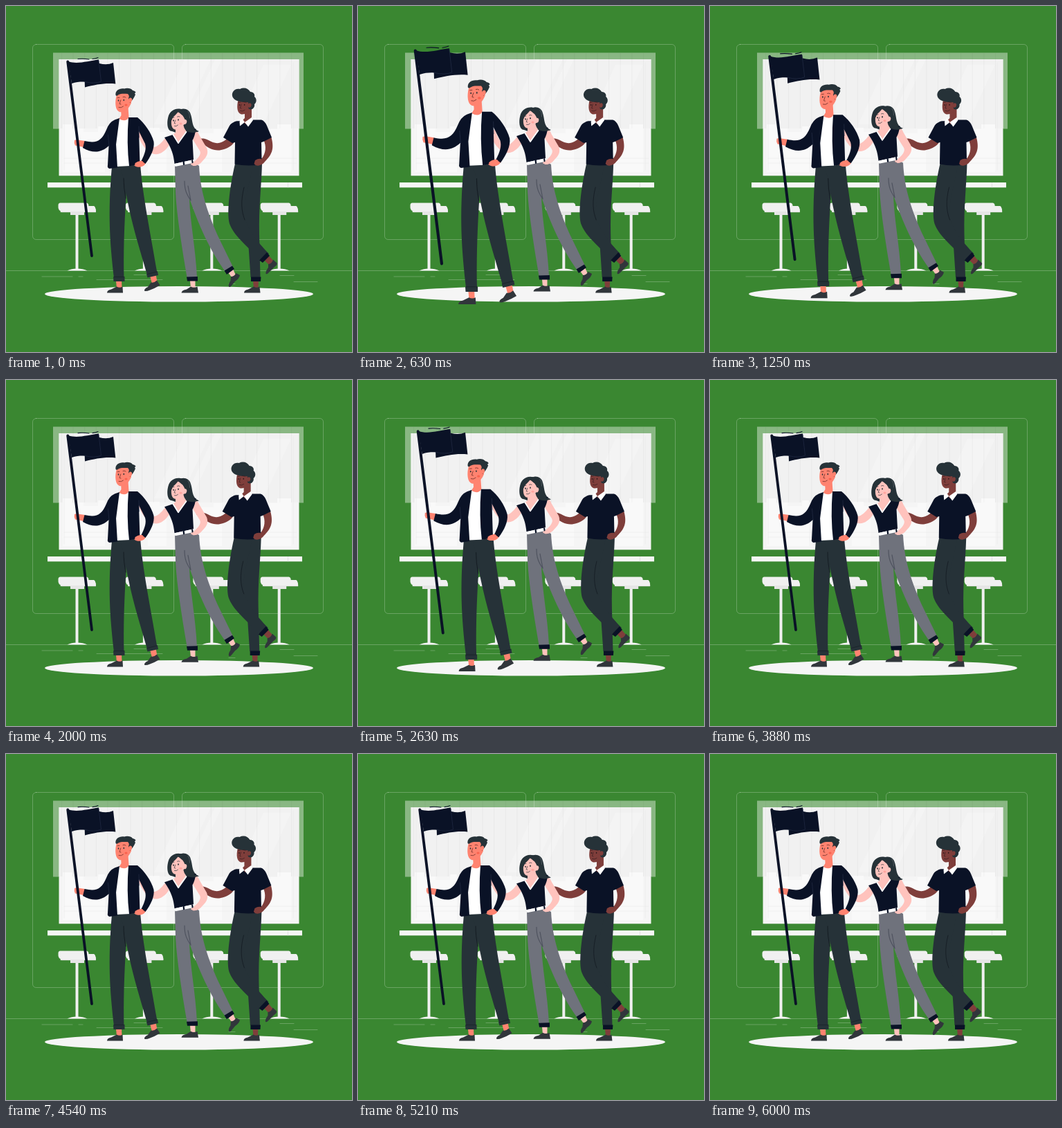
Recreate the animation shown at these times as an HTML page with a canvas. Size 500x500 px, loop 6.04 s.

```html
<!DOCTYPE html>
<html lang="en">
<head>
<meta charset="utf-8">
<title>Team with flag</title>
<style>
html, body { margin: 0; width: 100%; height: 100%; overflow: hidden; background: #3a8731; }
canvas { display: block; width: 500px; height: 500px; }
</style>
</head>
<body>
<canvas id="stage" width="500" height="500"></canvas>
<script>
const ctx = document.getElementById('stage').getContext('2d');
const LOOP = 6040, CYCLE = 6000;
const GREEN = '#3a8731', NAVY = '#0a1226', SLATE = '#263238', PALE = '#f5f5f5';
const CORAL = '#ff8370', ROSE = '#ffc3bd', BROWN = '#7f3e3b', GREY = '#6f727c', SHOE = '#31363b';

const paths = new Map();
function shape(d) {
  if (!paths.has(d)) paths.set(d, new Path2D(d));
  return paths.get(d);
}
function fill(color, d) {
  ctx.fillStyle = color;
  ctx.fill(shape(d));
}
function line(color, width, d) {
  ctx.strokeStyle = color;
  ctx.lineWidth = width;
  ctx.stroke(shape(d));
}
function rect(color, x, y, w, h) {
  ctx.fillStyle = color;
  ctx.fillRect(x, y, w, h);
}
function oval(color, x, y, rx, ry, turn = 0) {
  ctx.fillStyle = color;
  ctx.beginPath();
  ctx.ellipse(x, y, rx, ry, turn, 0, Math.PI * 2);
  ctx.fill();
}

// Piecewise linear track: [[position, value], ...]
function track(keys, p) {
  for (let i = 1; i < keys.length; i++) {
    const [a, u] = keys[i - 1], [b, v] = keys[i];
    if (p <= b) return u + (v - u) * (p - a) / (b - a);
  }
  return keys[keys.length - 1][1];
}
const PULSE = [[0, 1], [.1, 1.1], [.3, 1], [.4, 1], [.5, 1.1], [.6, 1], [1, 1]];
const FLOAT = [[0, 0], [.5, -10], [1, 0]];
const SHAKE = [[0, 0], [.1, -1], [.2, 2], [.3, -4], [.4, 4], [.5, -4], [.6, 4], [.7, -4], [.8, 2], [.9, -1], [1, 0]];

function stool(x) {
  rect('#f0f0f0', x - 2, 301, 4, 80);
  rect('#e6e6e6', x - 9.5, 297.5, 20, 4.5);
  fill('#ebebeb', `M${x - 22} 289H${x + 24}Q${x + 27} 289 ${x + 27.5} 298H${x - 24}Z`);
  fill('#f0f0f0', `M${x - 24} 284.5H${x + 14}Q${x + 17} 285 ${x + 17} 289H${x + 23}Q${x + 27} 289 ${x + 27.5} 297H${x - 20}Q${x - 28} 297 ${x - 27} 288Q${x - 27} 284.5 ${x - 24} 284.5Z`);
  line('#dedede', .6, `M${x - 22} 297.8H${x + 27}`);
  fill(PALE, `M${x - 14} 382.5Q${x - 8} 379.5 ${x} 379.5Q${x + 9} 379.5 ${x + 15} 382.5Z`);
}

function room() {
  rect(GREEN, 0, 0, 500, 500);
  const thin = 'rgba(255,255,255,.27)';
  ctx.strokeStyle = thin;
  ctx.lineWidth = .9;
  for (const x of [38.5, 254.5]) {
    ctx.beginPath();
    ctx.roundRect(x, 55.5, 204, 282, 5);
    ctx.stroke();
  }
  line(thin, .9, 'M0 382.5H500M52 391H96M105 391H111M131 395.5H226M185 388.5H205M396 389.5H416M416 398.5H450M322 401.5H331');

  rect(PALE, 76.5, 77, 347, 168.3);
  rect('#f1f1f1', 76.5, 77, 347, 100);
  fill('#f9f9f9', 'M82 240V171H96V177H112V182H133V174H143V240ZM205 240V176H222V182H232V240ZM280 240V184H300V178H312V240ZM358 240V178H392V171H412V240Z');
  fill('rgba(255,255,255,.2)', 'M258 77H296L252 171H214ZM302 77H312L268 171H258ZM372 85H412L372 171H332Z');
  line('#ececec', .8, 'M84 220H420M84 227H420M84 82V237M415 82V237');
  fill('rgba(255,255,255,.4)', 'M68 67.5H430V177.5H423.5V77H76.5V177.5H68Z');
  for (let x = 80; x < 424; x += 16.6) rect('rgba(0,0,0,.04)', x, 68, .9, 109);

  rect(PALE, 60, 255, 368, 7.3);
  rect('#dcdcdc', 407, 255, .8, 7.3);
  for (let i = 0; i < 4; i++) stool(102.5 + i * 97.4);
  oval(PALE, 250, 416.3, 194, 11.3);
}

function friend() {
  // reaching arm
  fill(BROWN, 'M322 189C315 197 307 200 299 197C292 194 289 191 282 191.5L277 192Q275 194 278 195.5L284 198C292 206 302 210 311 208C320 206 327 202 330 196Z');
  // standing and crossed legs
  fill(SLATE, 'M338 229L370 228C369 262 365 291 366 330L367.5 392H353.5L350 340L342 300Z');
  fill(SLATE, 'M331 228H357C352 258 343 282 345 305C348 320 363 341 380 358L370 369C352 350 331 334 324 317C318 304 323 263 331 228Z');
  line('#171f26', 1, 'M344 262C339 282 340 296 345 309');
  fill(BROWN, 'M357 397H365L364.5 408H358ZM373 367L380 361L387 369L380 374Z');
  fill(NAVY, 'M354 391.5H368.5L368 398H354ZM366 367.5L377 356L381 361L371 371Z');
  fill(SHOE, 'M344 414.5Q344 410.5 350 409.5L358 405.5Q362 408 366.5 405.5L367.5 414.5ZM375.5 387Q375 383 379 378L379 373Q384 373 386 366.5L391.5 371.5Q392.5 374 388 377L379 386Q377 388 375.5 387Z');
  // near arm
  fill(BROWN, 'M372 193L383.5 190C388 207 384 215 374 225Q370 231 363 230Q357 229 359 224Q364 219 370 220C375 213 377 203 372 193Z');
  fill(NAVY, 'M329 168C334 165 337 167 340 166L355 164.5L369 164.5Q374 166 377 173L384 190L372 196L369 197L369.5 221L366 229.5Q347 232 330.5 228.5L331 197L327 198L314 190L322 175Q324 170 329 168Z');
  fill(BROWN, 'M360 223Q366 219 371 222Q371 228 367 230Q361 232 358.5 228Z');
  fill(BROWN, 'M345 149L355 147L355 162L346 171L342 165L345 162Z');
  fill('#fff', 'M341 162L345 168L338 173.5L337.5 167ZM355 161L357 165L350 174.5L345 168Z');
  // head
  fill(BROWN, 'M335.5 136C333 146 334 155 340 156.5C347 157 354 153 356 143L352 133L340 132Z');
  fill(SLATE, 'M334 137C328 135 325 129 328 124C330 120 335 119 338 120C344 117 350 119 353 124C358 124 360 128 359 131C363 134 362 140 359 142C360 147 355 151 352 149C349 149 351 144 350 139C344 140 338 138 334 137Z');
  oval(BROWN, 352, 143.5, 2.6, 3.3, .2);
  oval('#271719', 337.5, 143, .75, 1.1);
  oval('#271719', 344.6, 142.8, .75, 1.1);
  line('#3f2022', .8, 'M336 139.5L339 139M343 138.5L346.5 139M340 142L338.5 147.5L340 148M338.5 151.5Q342 153 345 150.5');
}

function woman() {
  // arm around the shoulder
  fill(ROSE, 'M230 191L236 201C229 211 220 217 211 213C201 208 193 197 190 182L198 181C202 193 207 202 214 204Q221 203 230 191Z');
  fill(SLATE, 'M240 181C233 181 232 169 234.5 160C237 151 245 147 253 149C258 147 266 150 267 157C270 165 268 177 279 181Q272 184 265 181C263 186 250 185 240 181Z');
  // trousers
  fill(GREY, 'M244 231L271 226L279 231C281 270 292 301 309 338L328 377L317 384C299 359 282 327 265 278C266 312 274 350 276 392H261.5C254 348 247 304 245 270Z');
  line('#4f535f', 1.2, 'M258 253C258 266 261 272 267 281L263 260');
  fill(ROSE, 'M266 397H273.5V408H267ZM321 385L328 380L332 389L326 392Z');
  fill(NAVY, 'M261 391.5L277 391V397.5H262ZM315.5 382.5L327 375.5L330 380L319 388Z');
  fill(SHOE, 'M253.5 414.5Q254 410.5 261 409.5L267 405.5Q271 408 276.5 405.5L278 414.5ZM322 405.5Q321 402 324.5 397L325 391Q330 391 332.5 386L338 389Q337 394 331 398L326 404Q324 407 322 405.5Z');
  // near arm
  fill(ROSE, 'M270 180Q276 178 279.5 187L290 205C293 213 290 218 284 224Q279 231 271 231L267.5 229.5Q266 226 273 224C280 218 282 213 280 209L270 193Z');
  fill(NAVY, 'M229 190L241 186L249 199L260 182L274.5 177.5Q273 188 269.5 194L271 222L243.5 228C242 215 240 206 229 190Z');
  fill('#fff', 'M243.5 228L271 222L271.8 226.5L244.5 232Z');
  fill(NAVY, 'M255.5 225L257.7 224.5L258.3 229.5L256 230ZM268 222.5L270 222L270.8 227L268.7 227.5Z');
  fill(ROSE, 'M245 174L256 172L261 182L249 198L241 186L245 183Z');
  line('#fff', 1.8, 'M241.5 186L249 198L260.5 182');
  fill(ROSE, 'M267.5 229L273 224.5L280 226Q277 231 271 231Z');
  // face and hair
  fill(ROSE, 'M239.5 162C238 170 239 177 244 178.5C251 179.5 257 175 259 166L257 156L247 153Z');
  fill(SLATE, 'M237 168C235 156 241 149 249 149C257 148 263 152 264 162C266 173 270 180 278 181C267 186 258 181 257 174C261 170 259 163 255 158C251 155 250 154 249 152C247 157 241 159 239.5 165Z');
  oval(ROSE, 258.2, 167.5, 3, 3.7, .25);
  line('rgba(255,255,255,.3)', .6, 'M263 152Q266 156 265.5 162');
  oval(SLATE, 242, 165.5, .85, 1.2);
  oval(SLATE, 249, 164.4, .85, 1.2);
  oval('#ffa59f', 252.5, 170, 2.1, 1.5);
  line(SLATE, .7, 'M240.5 161.5L243 161M247.5 160Q249.5 159 251 160M244.8 165L243.2 169.5L244.8 170M243.5 173.5Q246.5 174.5 248.5 172');
}

function flag() {
  fill(NAVY, 'M113 86L135 83Q146 86 155 82L158.3 112.5C142 111 129 114 114 117.5Z');
  fill(NAVY, 'M90 80C103 85 119 79 134 77.5L138 109C128 113 111 106 95 112Z');
  line('#27304a', .6, 'M134 79L137.5 109Q128 113 114 109.5');
  line(NAVY, 1.1, 'M104 76.6Q111 75.8 120 77M125 76.6Q130 76 133 74.6');
}

function man() {
  flag();
  // legs
  fill(SLATE, 'M153 232L176 229C175 265 169 320 170.5 393H156C150 340 147 300 153 232Z');
  fill(SLATE, 'M165 232L194 228C197 272 209 329 218.5 386L204.5 390C192 347 178 304 170 250Z');
  line('#151d23', 1, 'M170 249C170 258 171 268 173 278');
  fill(CORAL, 'M159 397H167L167.5 408H160ZM208 390L216.5 387.5L218.5 399L211 401Z');
  fill(SLATE, 'M155 391.5H171.5V398H155.5ZM203 387.5L219 383.5L220 389L204.5 392.5Z');
  line('#151d23', .6, 'M156 391.5H171M204 387.5L218.5 383.8');
  fill(SHOE, 'M146 414.5Q146 410.5 152 409.5L160 405.5Q164 408 168.5 405.5L169 414.5ZM200 411.5Q199.5 408.5 205 406L209.5 399.5Q214 400.5 218 396.5L222.5 403.5Q215 408 208 410.5Q202 413 200 411.5Z');
  // shirt, neck
  fill('#fff', 'M161 163L178 161L180 231L160 232Z');
  fill(CORAL, 'M166 147L176.5 146L177.5 161Q173 168.5 163.5 163L166.5 158Z');
  // flag hand, pole and sleeve
  fill(CORAL, 'M114 195L107 194Q102 192.5 99 194Q98 198 100 201.5Q107 202.5 112 204Z');
  line(NAVY, 3.8, 'M89.2 80.5L124 361');
  fill(NAVY, 'M164 162L159 200L161 233.5L149.5 235Q146 234 147 230L148.5 202C138 212 126 213.5 111 205L113.5 195C131 199 138 195 145 179Q149 168 157 164.5Z');
  // hip arm
  fill(CORAL, 'M200 224Q193 222.5 187 227L185 230Q187 233 194 232.5Q200 231.5 202 227Z');
  fill(NAVY, 'M177 161L190 161C200 169 210 183 213.5 196C215 206 209 218 201.5 228L195.5 224C201 213 203 206 201 199L192 181L193.5 228L178 231.5Q174 198 177 161Z');
  line('#29324a', .6, 'M192 174L192.5 190M147.5 186L149 203');
  fill(CORAL, 'M186 228Q190 223.5 197 224L200.5 228Q198 232 192 232.5Q187 232.5 186 228Z');
  // head
  fill(CORAL, 'M159.5 130C157 140 158 151 164 153C171 155 178 148 181 140L181 126L163 125Z');
  fill(SLATE, 'M158.5 129C157.5 122 164 118.5 171 119.5C175 118 181 119 183 122Q187 123 187.5 125Q185 126 187 128C185 133 182 137 179 140L177 133Q179 130 176 127C170 127 165 126 160 130Z');
  oval(CORAL, 179.5, 136, 2.5, 3.4, .25);
  oval(SLATE, 162.5, 136.5, .8, 1.2);
  oval(SLATE, 170.3, 136, .8, 1.2);
  oval('#f8624e', 173.5, 143, 2.1, 1.6);
  line('#6f302a', .8, 'M161 132.7L164 132.4M169 131.5Q171 130.6 173 132M165.8 136L164 141.5L166 142M163 146.5Q166.5 148 169.5 145');
}

function frame(now) {
  const p = Math.min((now % LOOP) / CYCLE, 1);
  const s = track(PULSE, p);
  ctx.lineCap = 'round';
  ctx.lineJoin = 'round';
  room();

  ctx.save();
  ctx.translate(track(SHAKE, p), 0);
  friend();
  ctx.restore();

  ctx.save();
  ctx.translate(0, track(FLOAT, p));
  woman();
  ctx.restore();

  ctx.save();
  ctx.translate(155, 244.5);
  ctx.scale(s, s);
  ctx.translate(-155, -244.5);
  man();
  ctx.restore();
  requestAnimationFrame(frame);
}
frame(performance.now());
</script>
</body>
</html>
```
